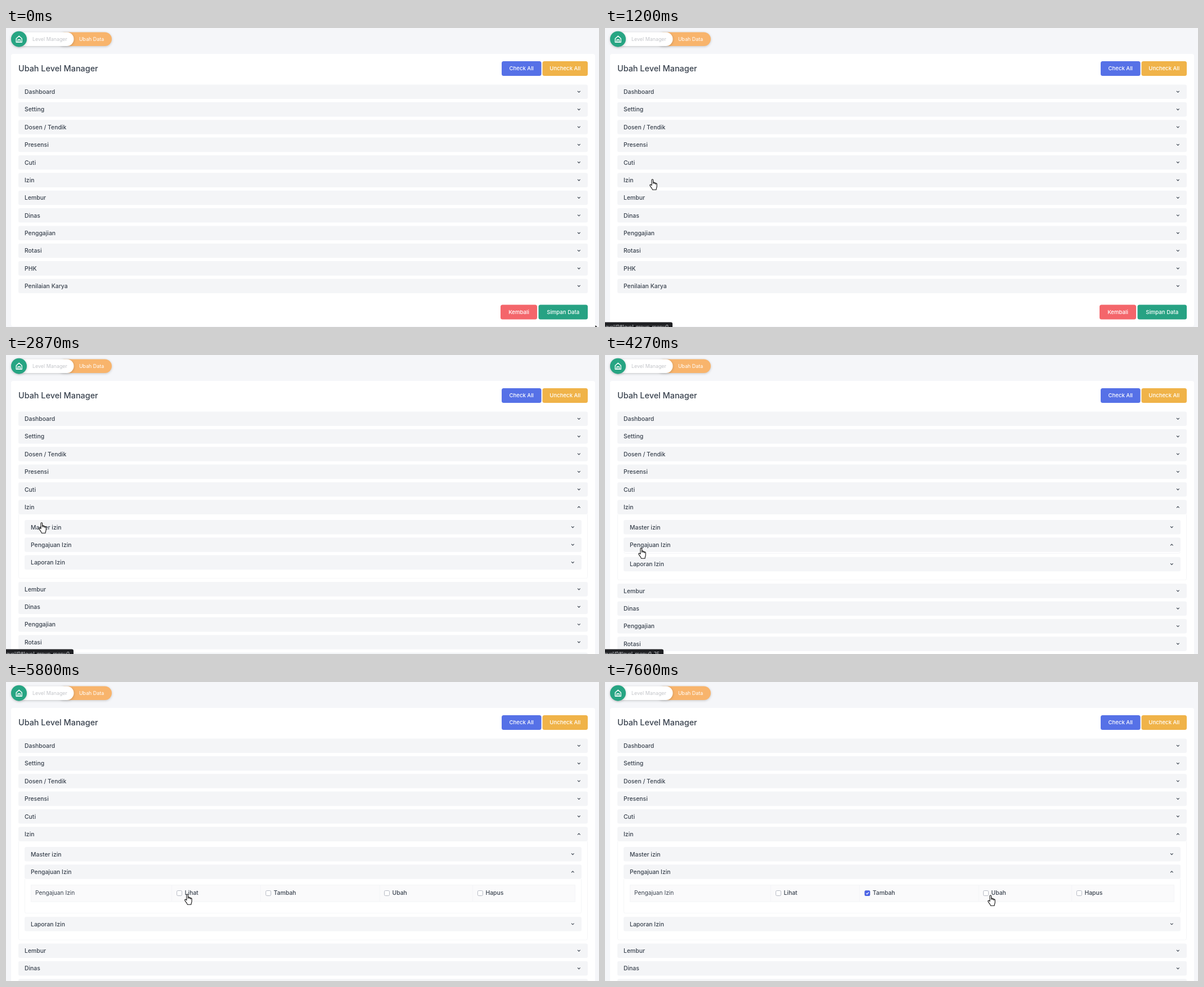
An HTML page that plays this animation: 1054 px wide and 531 px high, repeating every 8000 ms.

```html
<!DOCTYPE html>
<html lang="id">
<head>
<meta charset="utf-8">
<title>Ubah Level Manager</title>
<style>
  html, body { margin: 0; width: 100%; height: 100%; overflow: hidden; background: #f5f6f9; }
  svg { display: block; width: 1054px; height: 531px; font: 500 10.4px Inter, "Open Sans", sans-serif; fill: #39424e; }
  .row { fill: #f4f5f7; }
  .line { fill: none; stroke: #f4f5f7; }
  .chevron { fill: none; stroke: #39424e; stroke-width: 1.1; }
  .crumb { font-size: 8.9px; font-weight: 400; }
  .button { font-size: 9.6px; fill: #fff; text-anchor: middle; }
  .box { fill: #fff; stroke: #b4b8c2; }
  .raised { filter: drop-shadow(0 1px 2px #0003); }
  .cursor { fill: #fff; stroke: #111; stroke-width: 1.1; stroke-linejoin: round; }
</style>
</head>
<body>
<svg id="stage" viewBox="0 0 1054 531"></svg>
<script>
const LOOP = 8000, PITCH = 31.36, ROW_HEIGHT = 25.6;
const PANEL_TOP = 282.9, PANEL_HEIGHT = 114.4;
const SUB_TOP = 349.9, SUB_HEIGHT = 61.4;

const menu = ['Dashboard', 'Setting', 'Dosen / Tendik', 'Presensi', 'Cuti', 'Izin',
  'Lembur', 'Dinas', 'Penggajian', 'Rotasi', 'PHK', 'Penilaian Karya'];

// Cursor stops: time, left, top
const stops = [
  [70, 1048, 529], [730, 108, 241], [870, 111, 241], [1200, 79, 268], [1670, 70, 262],
  [1900, 58, 252], [2130, 57, 262], [2330, 57.5, 262], [2870, 58, 297], [3070, 56, 310],
  [3530, 57, 349], [3730, 57, 349], [3870, 59, 342], [4800, 59, 342], [5480, 326, 377],
  [5620, 326, 377], [5800, 317, 376], [6250, 535, 377], [6530, 500, 376], [6840, 500, 376],
  [7330, 676, 380], [7470, 676, 380], [7600, 680, 378]
];

const chevron = (x, y, id = '') =>
  `<path class="chevron" ${id && `id="${id}"`} d="M${x - 2.3} ${y - 1.3}l2.3 2.3 2.3-2.3"/>`;

function row(label, center, inset = 0, id = '') {
  const left = 22 + inset, right = 1034 - inset;
  return `<rect class="row" x="${left}" y="${center - ROW_HEIGHT / 2}" width="${right - left}" height="${ROW_HEIGHT}" rx="3"/>
    <text x="${left + 11}" y="${center + 3.8}">${label}</text>${chevron(right - 15.7, center, id)}`;
}

const menuRow = index => row(menu[index], 113.3 + PITCH * index, 0, index === 5 ? 'izinChevron' : '');

const button = (label, x, y, width, color) =>
  `<rect x="${x}" y="${y}" width="${width}" height="26" rx="3.5" fill="${color}"/>
   <text class="button" x="${x + width / 2}" y="${y + 16.3}">${label}</text>`;

const checkbox = (label, x) =>
  `<rect class="box" x="${x}" y="370.5" width="9" height="9" rx="2"/><text x="${x + 14}" y="378.4">${label}</text>`;

const clip = (id, y) => `<clipPath id="${id}"><rect id="${id}Rect" y="${y}" width="1054"/></clipPath>`;

document.getElementById('stage').innerHTML = `
  <defs>${clip('panelClip', PANEL_TOP)}${clip('subClip', SUB_TOP)}</defs>
  <rect width="1054" height="531" fill="#f5f6f9"/>
  <rect class="raised" x="92" y="7.5" width="96" height="24.5" rx="12.2" fill="#f8b46c"/>
  <rect class="raised" x="12" y="7.5" width="108.5" height="24.5" rx="12.2" fill="#fff"/>
  <circle class="raised" cx="23" cy="19.7" r="14" fill="#27a583"/>
  <path d="M18.2 18.8 23.2 14.3 28.2 18.8V25.2H18.2ZM21.3 25V20.8H25.1V25" fill="none" stroke="#fff" stroke-width="1.4" stroke-linejoin="round"/>
  <text class="crumb" x="47" y="23" fill="#c4c6ca">Level Manager</text>
  <text class="crumb" x="130" y="23" fill="#fff">Ubah Data</text>

  <rect id="card" x="9" y="46" width="1038" rx="4" fill="#fff"/>
  <text x="22" y="77" font-size="14.4">Ubah Level Manager</text>
  ${button('Check All', 881, 59, 70.5, '#5671e7')}
  ${button('Uncheck All', 953.5, 59, 80.5, '#f0b349')}
  ${[0, 1, 2, 3, 4, 5].map(menuRow).join('')}

  <g clip-path="url(#panelClip)">
    <rect id="panelBorder" class="line" x="22.5" y="270" width="1011" rx="3"/>
    ${row('Master izin', 305.7, 11)}
    ${row('Pengajuan Izin', 305.7 + PITCH, 11, 'subChevron')}
    <g clip-path="url(#subClip)">
      <rect id="subBorder" class="line" x="33.5" y="340" width="989" rx="3"/>
      <rect x="44" y="360" width="968" height="30.5" fill="#fafafb"/>
      <path class="line" d="M44 360.5H1012M44 390H1012M44.5 360V390M294.5 360V390M452.5 360V390M664.5 360V390M829.5 360V390M1011.5 360V390"/>
      <text x="52" y="378.4" font-size="10.2" font-weight="400">Pengajuan Izin</text>
      ${checkbox('Lihat', 303.7)}${checkbox('Tambah', 461.8)}${checkbox('Ubah', 672.5)}${checkbox('Hapus', 838.4)}
      <g id="checked">
        <rect x="461.5" y="370.3" width="9.6" height="9.6" rx="2" fill="#4b63e6"/>
        <path d="M464.2 375.2l1.6 1.6 2.8-3.3" fill="none" stroke="#fff" stroke-width="1.2"/>
      </g>
    </g>
    <g id="afterSub">${row('Laporan Izin', 305.7 + 2 * PITCH, 11)}</g>
  </g>

  <g id="afterPanel">
    ${[6, 7, 8, 9, 10, 11].map(menuRow).join('')}
    ${button('Kembali', 879, 491.5, 65, '#f4666b')}
    ${button('Simpan Data', 946.5, 491.5, 87.5, '#27a283')}
  </g>

  <g id="status">
    <rect id="statusBox" x="-10" y="522.5" height="20" rx="3" fill="#202124"/>
    <text id="statusText" y="533.5" text-anchor="end" fill="#e8eaed" style="font:9px 'Open Sans',sans-serif"></text>
  </g>
  <path id="arrow" class="cursor" d="M0 0V14l3.2-3 2 4.6 2-.9-2-4.5H9.6Z"/>
  <path id="hand" class="cursor" d="M4 11.5V2a1.3 1.3 0 0 1 2.6 0V8.2 7a1.1 1.1 0 0 1 2.2 0V8.4 8a1.1 1.1 0 0 1 2.2 0V9.4 9a1.1 1.1 0 0 1 2.2 0V13.5c0 2.2-1.2 3-1.2 5.8H5.4C5.4 17 1.5 14 .8 11.4.5 9.8 2.5 9.6 4 11.5Z"/>`;

const $ = id => document.getElementById(id);
const set = (id, name, value) => $(id).setAttribute(name, value);
const show = (id, visible) => set(id, 'visibility', visible ? 'visible' : 'hidden');
const clamp = value => Math.min(1, Math.max(0, value));
const smooth = p => p * p * (3 - 2 * p);

// CSS "ease": cubic-bezier(.25, .1, .25, 1)
function ease(progress) {
  const bezier = (a, b, s) => 3 * a * s * (1 - s) ** 2 + 3 * b * s * s * (1 - s) + s ** 3;
  let low = 0, high = 1;
  for (let i = 0; i < 20; i++) {
    const middle = (low + high) / 2;
    if (bezier(.25, .25, middle) < progress) low = middle; else high = middle;
  }
  return progress <= 0 ? 0 : bezier(.1, 1, high);
}

const collapse = (time, start, height) => height * ease(clamp((time - start) / 350));

function cursorAt(time) {
  const next = stops.findIndex(stop => stop[0] > time);
  if (next === 0) return stops[0].slice(1);
  if (next < 0) return stops[stops.length - 1].slice(1);
  const [t0, x0, y0] = stops[next - 1], [t1, x1, y1] = stops[next];
  const p = smooth((time - t0) / (t1 - t0));
  return [x0 + (x1 - x0) * p, y0 + (y1 - y0) * p];
}

function flip(id, open, x, y) {
  set(id, 'transform', open ? `rotate(180 ${x} ${y})` : '');
}

function render(time) {
  const sub = collapse(time, 4248, SUB_HEIGHT);
  const panel = collapse(time, 2324, PANEL_HEIGHT) + sub;
  set('card', 'height', 484 + panel);
  set('panelClipRect', 'height', panel);
  set('subClipRect', 'height', sub);
  set('panelBorder', 'height', PANEL_TOP + panel - 270.5);
  set('subBorder', 'height', SUB_TOP + sub - 340.5);
  set('afterSub', 'transform', `translate(0 ${sub})`);
  set('afterPanel', 'transform', `translate(0 ${panel})`);
  flip('izinChevron', time >= 2310, 1018.3, 270.1);
  flip('subChevron', time >= 4240, 1007.3, 337.06);
  show('checked', time >= 6670);

  const inGroup = time < 3000;
  show('status', time >= 950 && time < 5100);
  set('statusBox', 'width', inGroup ? 130 : 114);
  set('statusText', 'x', inGroup ? 113 : 97);
  $('statusText').textContent = 'level/9#' +
    (inGroup ? 'level_group_menu9' : time < 3400 ? 'level_menu9_24' : 'level_menu9_25');

  const [x, y] = cursorAt(time), pointing = y < 471;
  show('arrow', !pointing);
  show('hand', pointing);
  set(pointing ? 'hand' : 'arrow', 'transform', `translate(${x} ${y})`);
}

function tick() {
  render(performance.now() % LOOP);
  requestAnimationFrame(tick);
}
tick();
</script>
</body>
</html>
```
